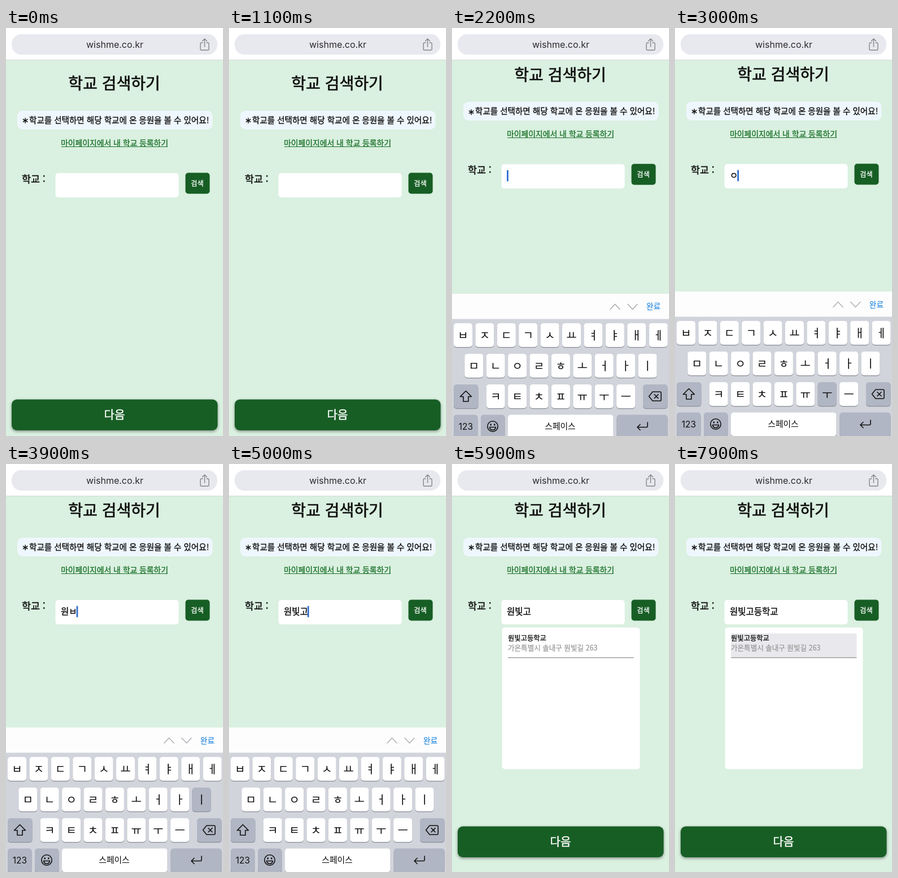
Animation, 384 px wide and 720 px high, one loop 8000 ms. Source, as an HTML page:

```html
<!DOCTYPE html>
<html lang="ko">
<head>
<meta charset="utf-8">
<title>학교 검색하기</title>
<style>
  html, body { margin: 0; width: 100%; height: 100%; overflow: hidden; background: #fff; }
  svg { display: block; width: 384px; height: 720px; }
  text { font-family: "Noto Sans CJK KR", "Noto Sans CJK", "Noto Sans CJK JP", sans-serif; white-space: pre; stroke-width: 0; }
  .page text { stroke-width: .022em; }
  .latin { font-family: Inter, Roboto, sans-serif; }
  .icon { fill: none; stroke: #111; stroke-width: 1.6; stroke-linecap: round; stroke-linejoin: round; }
</style>
</head>
<body>
<svg id="stage" viewBox="0 0 384 720"></svg>
<script>
const LOOP = 8000, STEP = 100;
const GREEN = '#175e25', LINK = '#176f26', KEY_GRAY = '#b0b6c3';
const KEYBOARD_TOP = 465, SCROLL = 16;

const SCHOOL = '원빛고등학교';
const ADDRESS = '가온특별시 솔내구 원빛길 263';

// press time, key, text once the key is released
const STROKES = [
  [2800, 'ㅇ', 'ㅇ'], [3000, 'ㅜ', '우'], [3200, 'ㅓ', '워'],
  [3500, 'ㄴ', '원'], [3700, 'ㅂ', '원ㅂ'], [3900, 'ㅣ', '원비'],
  [4000, 'ㅊ', '원빛'], [4200, 'ㄱ', '원빛ㄱ'], [4700, 'ㅗ', '원빛고']
];
const PRESS = 100;
const FOCUS = 1900, BLUR = 5600, RESULTS = 5700, ROW_TAP = 7700, PICK = 7800;
const CARET_OFF = [[2400, 2700], [5300, 5500]];

const stage = document.getElementById('stage');

function add(parent, tag, attrs, content) {
  const el = document.createElementNS('http://www.w3.org/2000/svg', tag);
  for (const name in attrs) el.setAttribute(name, attrs[name]);
  if (content) el.textContent = content;
  parent.append(el);
  return el;
}
const group = (parent, attrs) => add(parent, 'g', attrs);
const box = (parent, x, y, width, height, rx, fill, more) =>
  add(parent, 'rect', { x, y, width, height, rx, fill, ...more });
const line = (parent, d, more) => add(parent, 'path', { d, class: 'icon', ...more });

// cy is the vertical middle of the glyphs
const label = (parent, content, x, cy, size, fill = '#0c0c0c', more) =>
  add(parent, 'text', { x, y: cy + size * 0.37, 'font-size': size, fill, stroke: fill, ...more }, content);
const centred = (parent, content, x, cy, size, fill, more) =>
  label(parent, content, x, cy, size, fill, { 'text-anchor': 'middle', ...more });

// page
box(stage, 0, 56, 384, 664, 0, '#daf0e0');
const page = group(stage, { class: 'page' });
centred(page, '학교 검색하기', 191.5, 98, 28);
box(page, 20, 146, 345.5, 33, 9, '#eff7fe');
label(page, '∗', 28, 163, 14.7, undefined, { class: 'latin' });
label(page, '학교를 선택하면 해당 학교에 온 응원을 볼 수 있어요!', 41, 162.5, 14.55);
centred(page, '마이페이지에서 내 학교 등록하기', 192, 202.5, 13.85, LINK);
box(page, 98, 209, 188, 1, 0, LINK);
label(page, '학교 :', 28, 266.5, 17.4);
box(page, 87.5, 256, 218, 43, 5, '#fff');
const field = label(page, '', 97, 276.5, 15.5);
const caret = box(page, 97, 266.5, 2.8, 20, 1, '#2f6fd0');
box(page, 317.5, 255.5, 43, 37, 5, GREEN);
centred(page, '검색', 338.5, 274, 12.2, '#fff');

const results = group(page);
box(results, 88.5, 304.5, 244, 250, 5, '#fff');
const highlight = box(results, 99, 315, 222.5, 42, 2, '#e9e8ec');
label(results, SCHOOL, 99, 323, 12.3);
label(results, ADDRESS, 99, 340, 12.55, '#9c9c9c');
box(results, 99, 357, 222.5, 1.4, 0, '#9a9a9a');

box(page, 10, 655.5, 364.5, 54.5, 9, GREEN, { style: 'filter:drop-shadow(0 2px 2.5px rgba(0,0,0,.4))' });
centred(page, '다음', 192, 683, 20, '#fff');

// address bar
box(stage, 0, 0, 384, 56, 0, '#fff');
box(stage, 0, 56, 384, 1, 0, '#d2d6d4');
box(stage, 10, 11, 364, 36, 17, '#e8e8ef');
centred(stage, 'wishme.co.kr', 192.5, 28.7, 16, '#2a2a2c', { class: 'latin' });
line(stage, 'M348 26h-2q-2 0-2 2v9q0 2 2 2h11q2 0 2-2v-9q0-2-2-2h-2M351.5 33v-13.5M347.5 23l4-4 4 4',
  { style: 'stroke:#858589;stroke-width:1.4' });

// keyboard, laid out from its own top edge
const keyboard = group(stage);
box(keyboard, 0, 0, 384, 270, 0, '#d2d4dc');
box(keyboard, 0, 0, 384, 44.5, 0, '#fdfdfe');
const tools = group(keyboard);
line(tools, 'M280 27.5l8.5-9 8.5 9M311 18.5l8.5 9 8.5-9', { style: 'stroke:#b4b5b9;stroke-width:1.7' });
centred(tools, '완료', 356.5, 22.5, 13.8, '#0b7bdc');

const keys = {};
function key(x, y, width, fill = '#fff') {
  box(keyboard, x, y + 1.2, width, 42, 5, '#8b8e96');
  return box(keyboard, x, y, width, 42, 5, fill);
}
function keyRow(letters, x, y) {
  [...letters].forEach((letter, i) => {
    const left = x + i * 38.4;
    keys[letter] = key(left, y, 33);
    centred(keyboard, letter, left + 16.5, y + 21.5, 20);
  });
}
keyRow('ㅂㅈㄷㄱㅅㅛㅕㅑㅐㅔ', 3, 52);
keyRow('ㅁㄴㅇㄹㅎㅗㅓㅏㅣ', 22.3, 106);
keyRow('ㅋㅌㅊㅍㅠㅜㅡ', 60.7, 160);
key(3, 160, 43.5, KEY_GRAY);
key(338, 160, 43.5, KEY_GRAY);
key(3, 213.5, 42.5, KEY_GRAY);
key(51, 213.5, 42.5, KEY_GRAY);
key(99, 213.5, 186.5);
key(291.5, 213.5, 90, KEY_GRAY);

line(keyboard, 'M24.5 171.5l10 10h-5.5v8.5h-9v-8.5h-5.5z');
line(keyboard, 'M355 173h13q2 0 2 2v12q0 2-2 2h-13l-6.5-8zM358 177.5l7 7M365 177.5l-7 7');
centred(keyboard, '123', 24.3, 234.5, 15.5, '#111', { class: 'latin' });
add(keyboard, 'circle', { cx: 72, cy: 234, r: 9.2, class: 'icon' });
for (const cx of [68.7, 75.3]) add(keyboard, 'ellipse', { cx, cy: 231, rx: 1.3, ry: 1.7, fill: '#111' });
line(keyboard, 'M66.5 235.5h11q-1 5-5.5 5t-5.5-5z');
centred(keyboard, '스페이스', 191.5, 233.5, 14.8);
line(keyboard, 'M346 227v6.5q0 2-2 2h-15.5M333 230.5l-5 5 5 5');

// critically damped spring: 1 at the start, settling to 0
function remaining(t, start) {
  const x = Math.max(0, t - start) * 0.0192;
  return (1 + x) * Math.exp(-x);
}
const show = (el, on) => el.setAttribute('visibility', on ? 'inherit' : 'hidden');
const shift = (el, y) => el.setAttribute('transform', `translate(0 ${y.toFixed(2)})`);

function typed(t) {
  if (t >= PICK) return SCHOOL;
  const done = STROKES.filter(([at]) => t >= at + PRESS);
  return done.length ? done[done.length - 1][2] : '';
}

function draw(t) {
  shift(page, -SCROLL * (1 - remaining(t, 1870)));

  const hidden = t < 5000 ? remaining(t, 1881) : 1 - remaining(t, 5520);
  const top = KEYBOARD_TOP + (720 - KEYBOARD_TOP) * hidden;
  shift(keyboard, top);
  shift(tools, -9 * hidden);
  show(keyboard, hidden < 0.99);

  for (const name in keys) keys[name].setAttribute('fill', '#fff');
  for (const [at, name] of STROKES) {
    if (t >= at && t < at + PRESS) keys[name].setAttribute('fill', KEY_GRAY);
  }

  const value = typed(t);
  field.textContent = value;
  caret.setAttribute('x', 97 + (value ? field.getComputedTextLength() - 1 : 0));
  const blink = CARET_OFF.some(([from, to]) => t >= from && t < to);
  show(caret, t >= FOCUS && t < BLUR && !blink);

  show(results, t >= RESULTS);
  show(highlight, t >= ROW_TAP);
}

const began = performance.now();
function tick() {
  const t = (performance.now() - began) % LOOP;
  draw(Math.floor(t / STEP) * STEP);
  requestAnimationFrame(tick);
}
tick();
</script>
</body>
</html>
```
